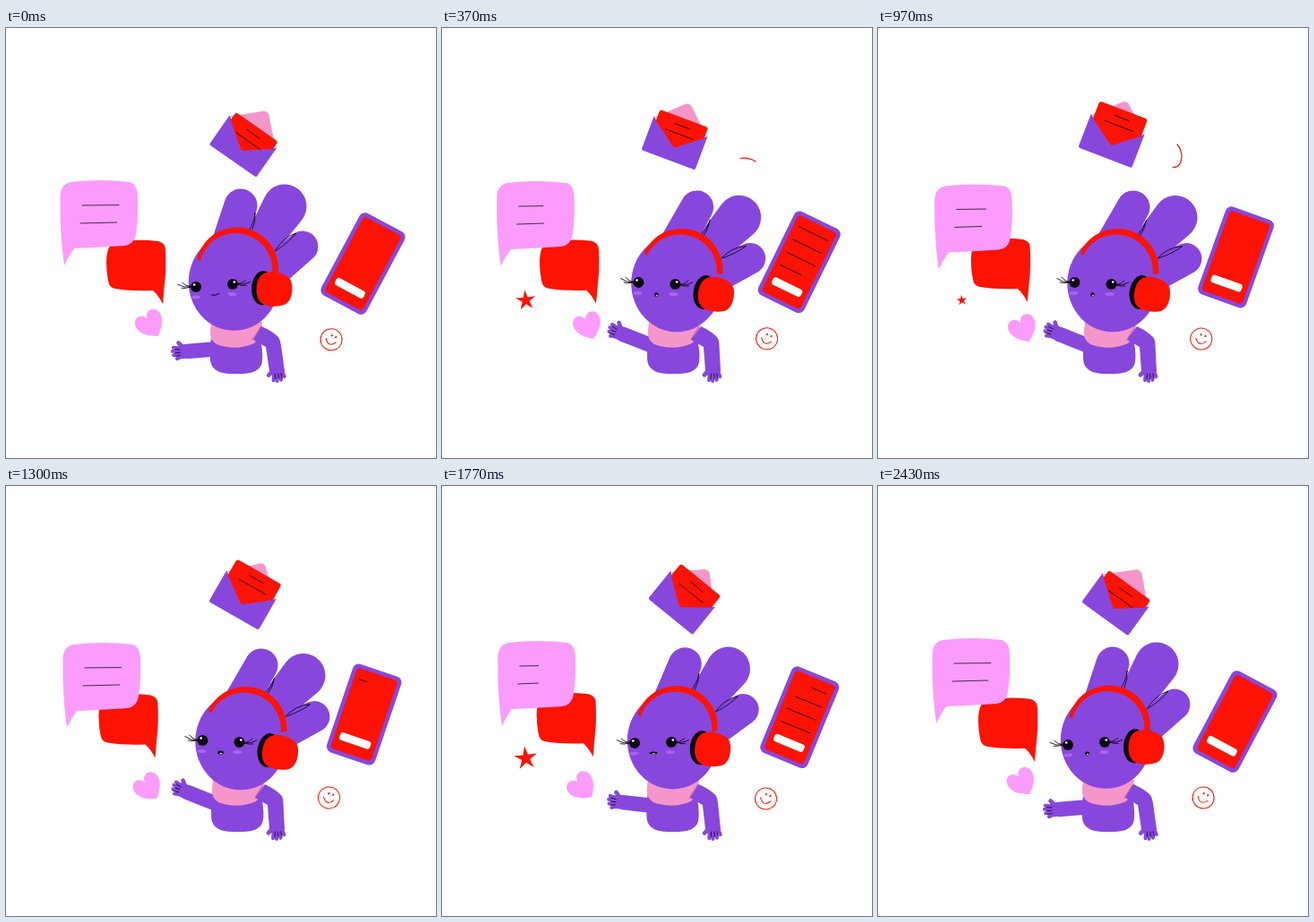
An HTML page with a canvas that plays this animation: 480x480 px, repeating every 2.47 s.

```html
<!DOCTYPE html>
<html lang="en">
<head>
<meta charset="utf-8">
<title>Chatting character</title>
<style>
html, body { margin: 0; width: 100%; height: 100%; overflow: hidden; background: #fff; }
canvas { display: block; width: 480px; height: 480px; }
</style>
</head>
<body>
<canvas id="stage" width="480" height="480"></canvas>
<script>
const ctx = document.getElementById('stage').getContext('2d');
const LOOP = 2470, HALF = LOOP / 2, TAU = Math.PI * 2, DEG = Math.PI / 180;
const PURPLE = '#8847dc', RED = '#fc1303', PINK = '#fb9cfc', ROSE = '#f596cb', INK = '#0a0410';
const KEYS = [0, 370, 730, 970, 1570, 2030];

const clamp = x => Math.max(0, Math.min(1, x));
const ramp = (t, start, length) => clamp((t - start) / length);
const smooth = u => u * u * (3 - 2 * u);
const mix = (a, b, u) => a + (b - a) * u;
const swing = t => (1 - Math.cos(t / LOOP * TAU)) / 2;

// Smooth periodic curve through a few keys.
function spline(t, values, keys = KEYS) {
  const n = keys.length;
  const time = k => keys[(k + n) % n] + Math.floor(k / n) * LOOP;
  const value = k => values[(k + n) % n];
  const slope = k => (value(k + 1) - value(k - 1)) / (time(k + 1) - time(k - 1));
  let i = n - 1;
  while (keys[i] > t) i--;
  const span = time(i + 1) - time(i), u = (t - time(i)) / span, v = 1 - u;
  return v * v * (1 + 2 * u) * value(i) + u * u * (3 - 2 * u) * value(i + 1)
    + span * u * v * (v * slope(i) - u * slope((i + 1) % n));
}

// Straight steps between keys, for pulses.
function steps(t, keys) {
  let i = keys.length - 2;
  while (i > 0 && keys[i][0] > t) i--;
  const [[t0, a], [t1, b]] = [keys[i], keys[i + 1]];
  return mix(a, b, ramp(t, t0, t1 - t0));
}

function at(x, y, degrees, draw) {
  ctx.save();
  ctx.translate(x, y);
  ctx.rotate(degrees * DEG);
  draw();
  ctx.restore();
}
function fill(color, path) {
  ctx.fillStyle = color;
  ctx.fill(typeof path === 'string' ? new Path2D(path) : path);
}
function stroke(color, width, path) {
  ctx.strokeStyle = color;
  ctx.lineWidth = width;
  ctx.stroke(typeof path === 'string' ? new Path2D(path) : path);
}
function line(x0, y0, x1, y1, color = INK, width = 0.75) {
  stroke(color, width, `M${x0} ${y0}L${x1} ${y1}`);
}
function ellipse(x, y, rx, ry, color, tilt = 0) {
  const p = new Path2D();
  p.ellipse(x, y, rx, ry, tilt * DEG, 0, TAU);
  fill(color, p);
}
function box(x, y, w, h, r, color) {
  const p = new Path2D();
  p.roundRect(x, y, w, h, r);
  fill(color, p);
}
// Hull of two circles.
function capsule(x0, y0, r0, x1, y1, r1, color) {
  const a = Math.atan2(y1 - y0, x1 - x0);
  const b = Math.acos((r0 - r1) / Math.hypot(x1 - x0, y1 - y0));
  const p = new Path2D();
  p.arc(x0, y0, r0, a + b, a - b + TAU);
  p.arc(x1, y1, r1, a - b, a + b);
  p.closePath();
  fill(color, p);
}

function bubbles(t) {
  at(spline(t, [0, -3, -6.5, -8.2, -8, -3.6]), spline(t, [0, -0.2, -1, -2, -6, -4]), 0, () =>
    fill(RED, 'M112 262Q112 242 122 239Q146 235 170 238Q178 240 178 248Q179 270 177 285L175 308Q170 298 164 293Q140 294 122 291Q115 290 114 282Q112 272 112 262Z'));
  const s = swing(t);
  at(3 * s, 5 * s, 0, () => {
    fill(PINK, 'M60.5 190Q60 175 72 172Q105 168 138 172Q147 174 147 190Q148 210 145 230Q143 242 132 243Q100 245 76 246Q70 254 65 265Q63 250 62 238Q60 215 60.5 190Z');
    const length = delay => 20 + 21 * (1 + Math.cos((t - delay) / HALF * TAU)) / 2;
    line(85, 198, 85 + length(0), 197.6);
    line(83, 218, 83 + length(55), 217);
    flares(t % HALF);
  });
}

function flares(t) {
  const grow = smooth(ramp(t, 545, 140)), leave = ramp(t, 690, 200);
  if (!grow || leave === 1) return;
  const size = grow * (1 - leave ** 3);
  for (const [x, y, angle, length] of [[34.2, 134.5, 56, 27], [74.7, 129.5, 95, 27], [23.7, 166.5, 19, 19]]) {
    at(x, y, angle, () => {
      ctx.translate(length * (1 - grow) - 10 * leave, 0);
      ctx.scale(size * length / 27, size * (length < 20 ? 0.85 : 1));
      fill(RED, 'M27 0Q17 5 8 5.6Q0 5.5 0 0Q0-5.5 8-5.6Q17-5 27 0Z');
    });
  }
}

function heart(t) {
  at(spline(t, [160.5, 162.5, 163, 161.5, 156, 156.2]), spline(t, [329.5, 331.2, 333, 334.5, 335.4, 333]),
    spline(t, [-32, -21, -21, -25, -43, -41]), () =>
      fill(PINK, 'M0 17C-8 12-16 5-15.5-4C-15-14-3-16 0-6C3-16 15-14 15.5-4C16 5 8 12 0 17Z'));
}

function star(t) {
  const size = steps(t, [[0, 0], [150, 0], [370, 0.87], [560, 1], [760, 1], [970, 0.46], [1120, 0],
    [1400, 0], [1570, 0.44], [1750, 1], [1900, 1], [2030, 0.6], [2250, 0], [LOOP, 0]]);
  if (!size) return;
  at(93.5, 304, -6, () => {
    const p = new Path2D();
    for (let i = 0; i < 10; i++) {
      const r = size * (i % 2 ? 4.8 : 13.5), a = i * TAU / 10 - TAU / 4;
      p.lineTo(r * Math.cos(a), r * Math.sin(a));
    }
    p.closePath();
    fill(RED, p);
  });
}

function envelope(t) {
  const top = spline(t, [-26.7, -29.6, -36, -37, -35.8, -29.8]);
  at(spline(t, [264.5, 259.5, 258.5, 260.5, 266.5, 267.5]), spline(t, [132, 128.5, 127, 126, 129, 132]),
    spline(t, [35, 20.5, 15.6, 21, 36, 40.5]), () => {
      fill(ROSE, 'M-31-19L-4-45Q0-48 4-45L31-19Z');
      fill(PURPLE, 'M-32-20L0 4L32-20V18Q32 20 30 20H-30Q-32 20-32 18Z');
      ctx.save();
      ctx.clip(new Path2D('M-32-60H32V-19L4 3Q1 6-2 3L-32-19Z'));
      box(-28.2, top, 57.4, 50, 3, RED);
      line(-7, top + 9, 10.5, top + 9);
      line(-15, top + 18.5, 18.5, top + 18.5);
      ctx.restore();
    });
}

function phone(t) {
  const s = swing(t);
  at(398.5 + 1.2 * s, 263 - 8 * s, 28 - 9.3 * s, () => {
    box(-28.5, -52, 57, 104, 7, PURPLE);
    box(-24, -47.5, 48, 95, 4, RED);
    box(-18, 26.5, 36, 9, 3, '#fff');
    for (let i = 0; i < 4; i++) {
      const from = ramp(t % HALF, 440 + 70 * i, 190), to = ramp(t % HALF, 20 + 70 * i, 190);
      const y = -35.5 + 15.8 * i;
      if (to > from) line(-17.5 + 35 * from, y, -17.5 + 35 * to, y);
    }
  });
}

function smiley(t) {
  const a = t / LOOP * TAU;
  at(361.8 + 1.3 * Math.cos(a), 347.8 - 1.2 * Math.sin(a), 25 - 8 * swing(t), () => {
    const p = new Path2D();
    p.arc(0, 0, 12, 0, TAU);
    p.moveTo(-6, 1);
    p.quadraticCurveTo(0, 10, 6, 1);
    stroke(RED, 1, p);
    ellipse(-1.5, -4.5, 1, 1.2, RED);
    ellipse(3.5, -4.5, 1, 1.2, RED);
  });
}

// A short stroke that runs along its path and vanishes.
function dash(t, centre, path, length) {
  const u = ramp(t, centre - 110, 220);
  if (u <= 0 || u >= 1) return;
  ctx.save();
  ctx.setLineDash([length, 200]);
  ctx.lineDashOffset = length * Math.sign(0.5 - u) * Math.max(0, Math.abs(2 * u - 1) - 0.3) / 0.7;
  stroke(RED, 1.2, path);
  ctx.restore();
}

function hand(x, y, angle) {
  at(x, y, angle, () => {
    ellipse(5, 0, 8, 8, PURPLE);
    const tips = [[17, 5], [18, 1], [17, -3.5], [13.5, -7.5]];
    for (const [tx, ty] of tips) line(5, ty * 0.7, tx - 2, ty, PURPLE, 4);
    line(3, 4, 9, 10, PURPLE, 4.5);
    for (const y0 of [3, -1, -5]) line(8, y0 * 0.8, 13.5, y0);
  });
}

function eye(x, y, side, open) {
  if (open > 0.4) {
    ellipse(x, y, 6, 6 * open, INK);
    ellipse(x + 1.8 * side, y - 2.5, 1.3, 1.3, '#fff');
  } else {
    const p = new Path2D();
    p.ellipse(x, y + 3.5, 6.2, 3.6, 0, 0, Math.PI);
    fill(INK, p);
  }
}

function lashes(x, y, side, tilt) {
  at(x, y, tilt, () => {
    ctx.scale(side, 1);
    stroke(INK, 0.85, 'M0 1Q7 2 14-2M0 0Q4 1 9-4M0 1Q6 3 10 2');
  });
}

function character(t) {
  const turn = smooth(ramp(t, 0, 400)) - smooth(ramp(t, 1500, 480));
  const lag = turn - 0.07 * Math.sin(Math.PI * ramp(t, 1830, 440));
  const v = (a, b) => mix(a, b, turn);
  const e = (a, b) => mix(a, b, lag);

  // Ears
  capsule(e(249, 263), 239, 19, e(262, 285), e(198, 200), 18.5, PURPLE);
  capsule(e(285, 300), e(240, 246), 19, e(311, 332), e(199, 211.5), 24.5, PURPLE);
  capsule(e(302, 310), e(268, 275), 18.5, e(331, 344), e(244, 257.5), 17.4, PURPLE);
  at(e(271, 288), e(226, 232), e(0, 14), () => stroke(INK, 0.8, 'M0 0Q6-8 7-20Q8-10 4-1'));
  at(e(299, 310), e(251, 259), e(0, 14), () => stroke(INK, 0.8, 'M0 0Q10-18 25-22Q17-12 3-3'));

  // Torso, scarf and arms
  at(v(0, 1.2), 0, 0, () =>
    fill(PURPLE, 'M229 345Q256 338 283 345Q287 358 286 371Q285 386 262 386H252Q230 386 228 371Q227 358 229 345Z'));
  const wristX = v(202, 201.5), wristY = v(361, 341.5);
  line(238, v(358, 356), wristX, wristY, PURPLE, 16.5);
  hand(wristX, wristY, v(177, 205));
  at(v(0, 2), 0, 0, () =>
    fill(ROSE, 'M229 328H286Q286 345 277 352Q257 361 235 353Q227 348 228 338Z'));
  fill(PURPLE, `M${v(276, 278)} 348L${v(285, 289)} 333Q${v(297, 300)} 338 ${v(304, 307)} 345Q${v(306, 309.5)} 348 ${v(307, 309.5)} 354L311 383H294L${v(290, 292)} 356Z`);
  line(v(275, 278), 348, v(285, 287), 333, '#9a4a96');
  hand(302.5, 378, v(86, 88));

  // Head and headphones
  const bandX = v(258, 267.5), bandY = v(268.5, 270), bandStart = v(194, 205);
  ellipse(bandX, bandY, 43, 43, PURPLE);
  ellipse(v(254.5, 262), v(283.5, 285), 50.7, 54.3, PURPLE);
  const band = new Path2D();
  band.arc(bandX, bandY, 46, bandStart * DEG, 365 * DEG);
  band.arc(bandX - 1.5, bandY + 1.5, 41, 365 * DEG, bandStart * DEG, true);
  band.closePath();
  fill(RED, band);
  at(v(299.5, 306), v(291.5, 297.5), v(3, 9), () => {
    ellipse(-13, -0.5, 12.5, 19, INK);
    fill(RED, 'M-20 0Q-20-17-6-19Q4-20 12-16Q20-13 20 0Q20 13 12 17Q3 20-6 19Q-20 17-20 0Z');
  });

  // Face
  const open = steps(t, [[0, 1], [1480, 1], [1535, 0], [1605, 0], [1670, 1], [LOOP, 1]]);
  const lid = open > 0.4 ? 0 : 3;
  eye(v(212, 219.5), v(289, 284), -1, open);
  eye(v(253, 260.5), 286, 1, open);
  lashes(v(206, 213.5), v(288, 283) + lid, -1, v(-2, 6) + lid * 6);
  lashes(v(258.5, 266), v(285, 286) + lid, 1, v(2, 0) - lid * 5);
  ellipse(v(212, 218.5), v(300.5, 296), 5, 2, '#a965ea', v(-6, 0));
  ellipse(v(252.5, 258.5), 297, 5, 2, '#a965ea');
  mouth(v(233.5, 239.5), v(298.5, 297.5), t);
}

function mouth(x, y, t) {
  const keys = [...KEYS, 2430];
  const width = spline(t, [8.5, 4.5, 8, 4.5, 9, 8, 5], keys);
  const height = Math.max(0.8, spline(t, [0.9, 5, 3.6, 5, 3.4, 3.4, 4], keys));
  if (height < 1.8) {
    stroke(INK, 1, `M${x - width / 2} ${y - 0.5}Q${x} ${y + 1} ${x + width / 2} ${y - 2}`);
    return;
  }
  ellipse(x, y, width / 2, height / 2, INK);
  ellipse(x + 0.5, y + height * 0.22, width * 0.22, height * 0.18, '#f5d9f0');
}

function draw(t) {
  ctx.fillStyle = '#fff';
  ctx.fillRect(0, 0, 480, 480);
  ctx.lineCap = ctx.lineJoin = 'round';
  bubbles(t);
  heart(t);
  star(t);
  envelope(t);
  phone(t);
  smiley(t);
  const over = 'M333 145.5Q342 144 350 149';
  dash(t, 370, over, 18);
  dash(t, 970, 'M334 130Q339 136 339 144Q338 156 329 155.5', 34);
  dash(t, 2030, over, 18);
  character(t);
}

const start = performance.now();
function tick() {
  draw((performance.now() - start) % LOOP);
  requestAnimationFrame(tick);
}
tick();
</script>
</body>
</html>
```
